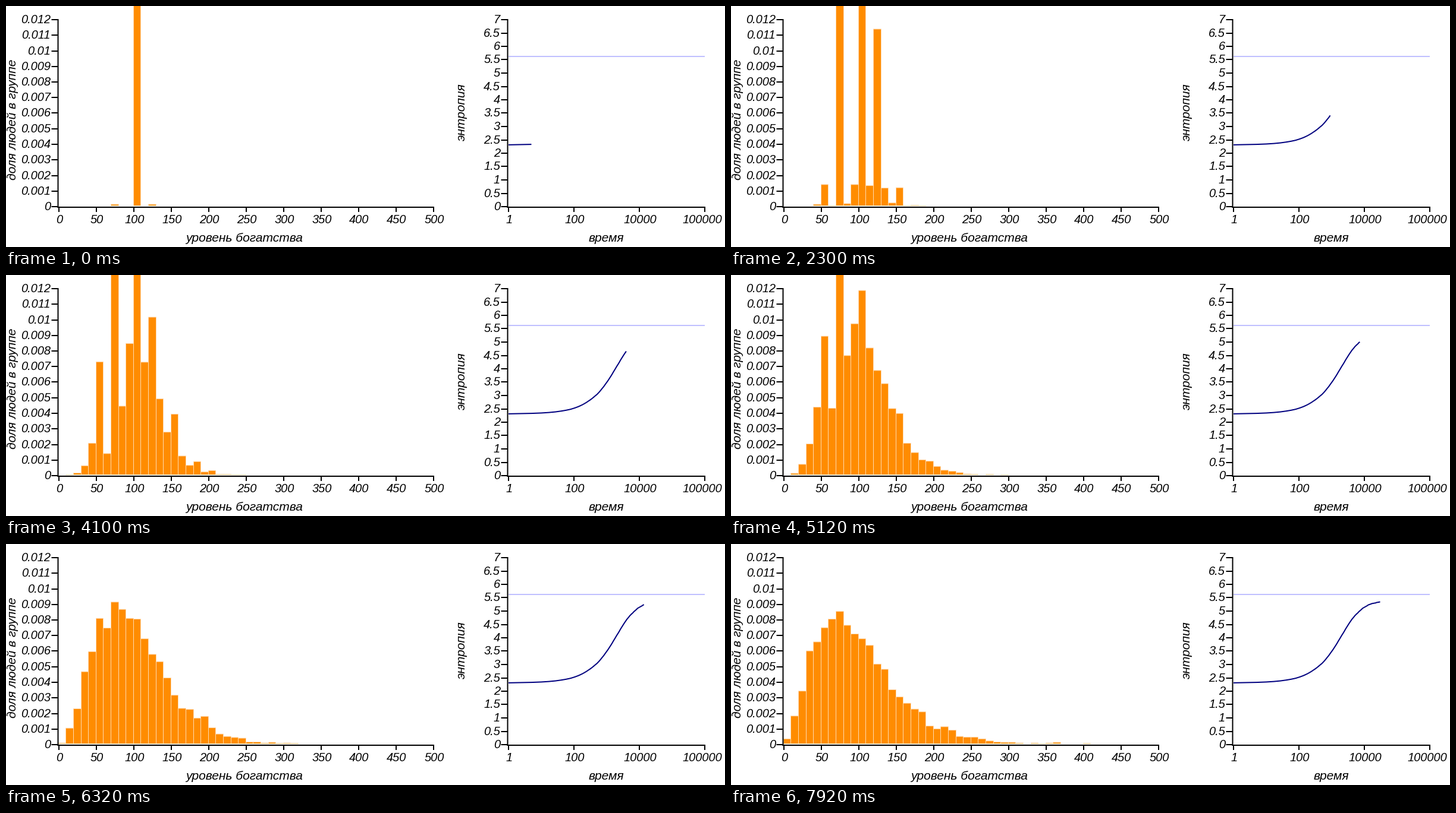
These frames come from a looping animation (1209 px wide and 406 px high, 8 s). A matplotlib script:

```python
import matplotlib.pyplot as plt
import numpy as np
from matplotlib.animation import FuncAnimation
from matplotlib.patches import Rectangle

W, H, DPI = 1209, 406, 64
PX = 72 / DPI  # points per pixel
FRAMES, INTERVAL = 80, 100
PEOPLE, START, SHARE = 4500, 100.0, 0.25
BINS, BIN_WIDTH = 50, 10
BASE = 337

plt.rcParams["font.family"] = "Liberation Sans"
plt.rcParams["font.style"] = "italic"

fig = plt.figure(figsize=(W / DPI, H / DPI), dpi=DPI, facecolor="white")
ax = fig.add_axes([0, 0, 1, 1])
ax.set(xlim=(0, W), ylim=(H, 0))
ax.axis("off")
text_area = Rectangle((0, 0), 1204, H, transform=ax.transData)


def stroke(xs, ys, color="black", z=3):
    return ax.plot(xs, ys, color=color, lw=2 * PX, zorder=z, snap=False,
                   solid_capstyle="butt", solid_joinstyle="round")[0]


def label(x, y, s, ha="center", va="baseline", size=20, rotation=0):
    t = ax.text(x, y, s, ha=ha, va=va, fontsize=size * PX, zorder=4,
                rotation=rotation, clip_on=True)
    t.set_clip_path(text_area)


def axes_lines(x0, x1, y_values, x_ticks):
    """Draw an L-shaped pair of axes with ticks and labels."""
    stroke([x0, x0], [22, 340])
    stroke([x0 - 1, x1], [339, 339])
    for y, v in zip(np.linspace(338, 23, len(y_values)), y_values):
        stroke([x0 - 11, x0], [round(y)] * 2)
        label(x0 - 12.5, y + 6, f"{v:g}", "right")
    for x, v in x_ticks:
        stroke([x, x], [339, 347])
        label(x + 1, 366, str(v))


def title(x, y, s, rotation=0):
    label(x, y, s, va="center" if rotation else "baseline", size=21,
          rotation=rotation)


axes_lines(87.5, 720, np.arange(13) / 1000,
           [(89 + 63 * i, 50 * i) for i in range(11)])
axes_lines(843.5, 1176, np.arange(15) / 2,
           [(845 + 110 * i, 100 ** i) for i in range(4)])
title(400.5, 397, "уровень богатства")
title(1009.5, 397, "время")
title(11.5, 191.5, "доля людей в группе", 90)
title(766.5, 179, "энтропия", 90)

# Exchanges made by each frame; the cube root grows almost evenly
pace = np.interp(np.linspace(0, 80, FRAMES), [0, 8, 18, 45, 60, 80],
                 [1.71, 5.12, 7.88, 17, 22.3, 31.2])
times = np.round(pace ** 3).astype(int)


def simulate():
    """Random people hand a quarter of their wealth to random others."""
    pairs = np.random.default_rng(7).integers(PEOPLE, size=(times[-1], 2))
    wealth = np.full(PEOPLE, START)
    done, density = 0, []
    for t in times:
        for giver, taker in pairs[done:t]:
            gift = SHARE * wealth[giver]
            wealth[giver] -= gift
            wealth[taker] += gift
        done = t
        count, _ = np.histogram(wealth, BINS, (0, BINS * BIN_WIDTH))
        density.append(count / PEOPLE / BIN_WIDTH)
    return np.array(density)


density = simulate()
logs = np.log(np.where(density > 0, density, 1))
entropy = -(density * logs).sum(axis=1) * BIN_WIDTH

heights = density * 26250
curve_x = np.append(845, 845 + 55 * np.log10(times))
curve_y = 337.5 - 45 * np.append(np.log(BIN_WIDTH), entropy)

edges = np.floor(88.2 + 12.6 * np.arange(BINS + 1)) + 0.5
bars = [ax.add_patch(Rectangle((a, BASE), b - a, 0, fc="#ff8c00", ec="#ffd9ae",
                               lw=PX, zorder=1, snap=False))
        for a, b in zip(edges, edges[1:])]

stroke([845, 1175], [85, 85], "#c0c0ff", 2)
curve = stroke([], [], "#000080", 5)


def update(i):
    for bar, h in zip(bars, heights[i]):
        bar.set_visible(h > 0)
        bar.set_y(BASE - h)
        bar.set_height(max(h - 0.5, 0))
    curve.set_data(curve_x[:i + 2], curve_y[:i + 2])
    return [*bars, curve]


anim = FuncAnimation(fig, update, frames=FRAMES, interval=INTERVAL,
                     repeat=True, repeat_delay=0, blit=False)
plt.show()
```
